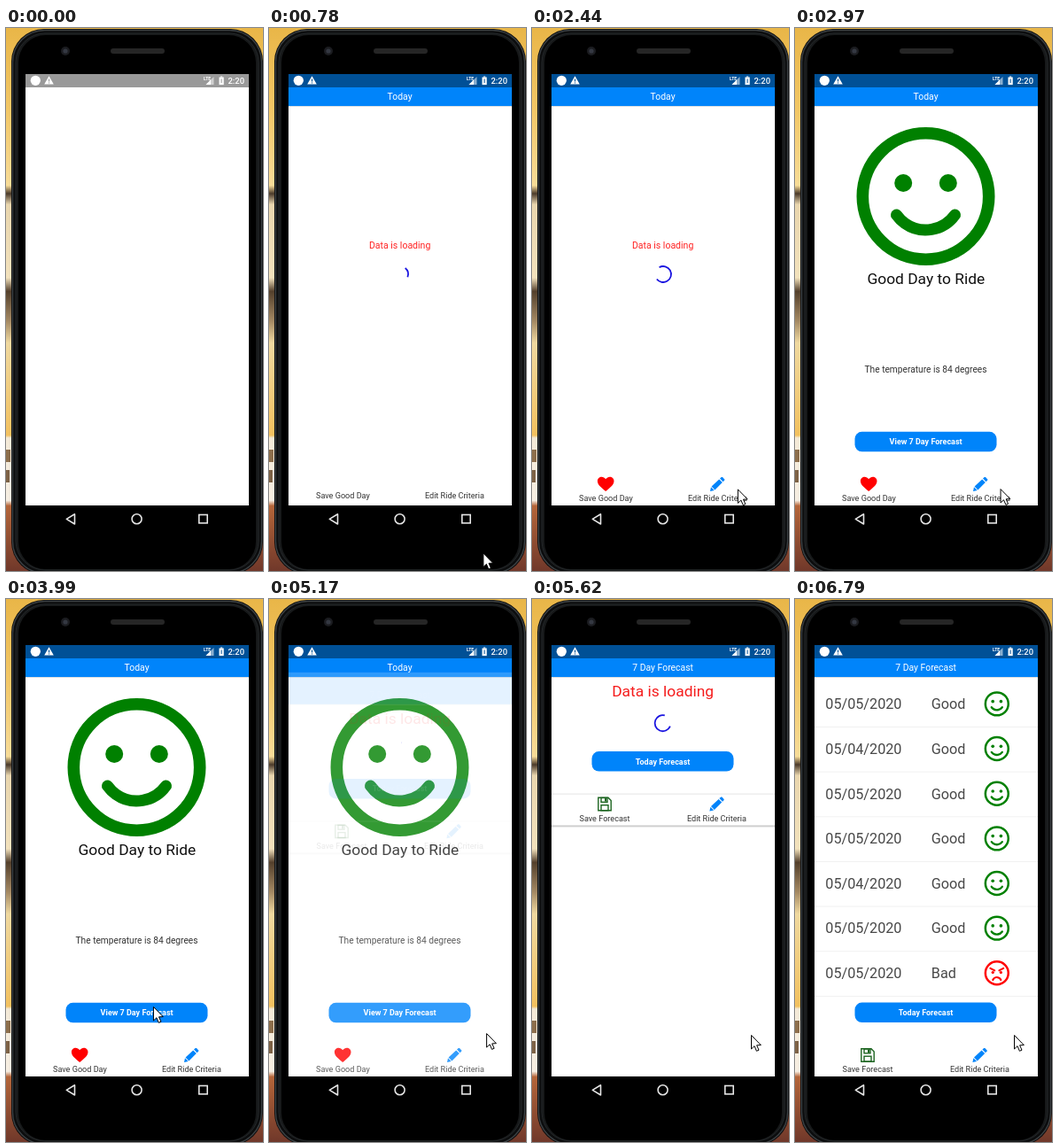
These frames come from a looping animation (290 by 613 pixels, 8000 ms). An HTML page with a canvas:

```html
<!DOCTYPE html>
<html lang="en">
<head>
<meta charset="utf-8">
<title>Ride day app</title>
<style>
  html, body { margin: 0; width: 100%; height: 100%; overflow: hidden; background: #000; }
  canvas { display: block; width: 290px; height: 613px; }
</style>
</head>
<body>
<canvas id="stage"></canvas>
<script>
const LOOP = 8000;
const BLUE = '#0084fa', GREEN = '#008000', RED = '#ff0000', INK = '#333';
const canvas = document.getElementById('stage');
const ctx = canvas.getContext('2d');
const ratio = window.devicePixelRatio || 1;
canvas.width = 290 * ratio;
canvas.height = 613 * ratio;

const clamp01 = v => Math.min(1, Math.max(0, v));

// Piecewise linear track through points [key, value, value...]
function track(points, key) {
  let i = 1;
  while (i < points.length - 1 && points[i][0] < key) i++;
  const a = points[i - 1], b = points[i];
  const u = clamp01((key - a[0]) / (b[0] - a[0]));
  return a.slice(1).map((v, k) => v + (b[k + 1] - v) * u);
}

// cubic-bezier(.4, 0, .2, 1)
function standardEase(x) {
  let lo = 0, hi = 1, s = 0.5;
  for (let i = 0; i < 20; i++) {
    s = (lo + hi) / 2;
    const bx = 1.2 * (1 - s) ** 2 * s + 0.6 * (1 - s) * s * s + s ** 3;
    if (bx < x) lo = s; else hi = s;
  }
  return s * s * (3 - 2 * s);
}

function rect(x, y, w, h, color) {
  ctx.fillStyle = color;
  ctx.fillRect(x, y, w, h);
}

function rounded(x, y, w, h, r, fill, stroke, width = 1) {
  ctx.beginPath();
  ctx.roundRect(x, y, w, h, r);
  if (fill) { ctx.fillStyle = fill; ctx.fill(); }
  if (stroke) { ctx.strokeStyle = stroke; ctx.lineWidth = width; ctx.stroke(); }
}

function disc(x, y, r, color) {
  ctx.beginPath();
  ctx.arc(x, y, r, 0, 7);
  ctx.fillStyle = color;
  ctx.fill();
}

function arc(x, y, r, from, to, color, width) {
  ctx.beginPath();
  ctx.arc(x, y, r, from, to);
  ctx.strokeStyle = color;
  ctx.lineWidth = width;
  ctx.stroke();
}

function polygon(points, fill, stroke, width) {
  ctx.beginPath();
  points.forEach(([x, y]) => ctx.lineTo(x, y));
  ctx.closePath();
  if (fill) { ctx.fillStyle = fill; ctx.fill(); }
  if (stroke) { ctx.strokeStyle = stroke; ctx.lineWidth = width; ctx.stroke(); }
}

function text(str, x, y, size, color, align = 'center', weight = 400) {
  ctx.font = `${weight} ${size}px Roboto, sans-serif`;
  ctx.textAlign = align;
  ctx.fillStyle = color;
  ctx.fillText(str, x, y);
}

function at(x, y, scale, draw) {
  ctx.save();
  ctx.translate(x, y);
  ctx.scale(scale, scale);
  draw();
  ctx.restore();
}

function wallpaper() {
  const g = ctx.createLinearGradient(0, 0, 0, 613);
  [[0, '#e9b648'], [0.15, '#f3c766'], [0.29, '#f8dc98'], [0.305, '#4b3a2a'], [0.325, '#e9d6ae'],
   [0.46, '#f3e2bd'], [0.485, '#54402c'], [0.54, '#a58a64'], [0.58, '#f0d9a0'], [0.75, '#f3c15f'],
   [0.755, '#f4ead8'], [0.87, '#f6eee2'], [0.88, '#b5663a'], [1, '#70382a']]
    .forEach(([p, c]) => g.addColorStop(p, c));
  rect(0, 0, 290, 613, g);
  rect(0, 476, 5, 14, '#8d6f4c');
  rect(0, 499, 4, 14, '#7d6246');
}

function phone() {
  rounded(6, 1, 284, 616, 37, '#0c0d0e');
  rounded(7.5, 2.5, 281, 613, 36, null, '#3c4144', 1.4);
  rounded(11, 6, 274, 606, 33, '#17191a', '#24282a', 1);
  rounded(14, 8, 268, 603, 31, '#000');
  disc(67, 26, 5, '#1b1c20');
  disc(67, 26, 2.6, '#343842');
  rounded(118, 23, 61, 6, 3, '#262626');

  ctx.lineJoin = 'round';
  polygon([[77.5, 548.8], [77.5, 560], [68.3, 554.4]], null, '#e4e4e4', 1.6);
  arc(147.6, 554.2, 5.5, 0, 7, '#e4e4e4', 1.6);
  ctx.lineJoin = 'miter';
  ctx.strokeRect(217.8, 549.5, 9.4, 9.4);
}

function statusBar(color) {
  rect(22, 52, 252, 15, color);
  disc(33.3, 59.3, 5.6, '#fff');
  polygon([[48.5, 54.3], [53.8, 63.6], [43.2, 63.6]], '#fff');
  rect(48, 57.5, 1.1, 3, color);
  rect(48, 61.4, 1.1, 1.1, color);
  text('LTE', 223, 58.5, 5, '#fff', 'left', 700);
  polygon([[234.5, 55], [234.5, 64], [225.5, 64]], '#ffffff88');
  polygon([[231, 58.5], [231, 64], [225.5, 64]], '#fff');
  rect(240.5, 55.5, 5.2, 8.6, '#fff');
  rect(242, 54.5, 2.2, 1, '#fff');
  rect(242.6, 57.5, 1, 4.5, color);
  text('2:20', 269, 62.8, 9.4, '#fff', 'right', 500);
}

function header(title) {
  rect(22, 52, 252, 36, BLUE);
  rect(22, 88, 252, 1, '#dcdfe3');
  text(title, 147.6, 81.4, 10.4, '#fff');
}

function button(label, y, opacity = 1) {
  ctx.save();
  ctx.globalAlpha *= opacity;
  rounded(67.5, y, 160, 22.5, 8, BLUE);
  text(label, 147.6, y + 14.5, 9, '#fff', 'center', 700);
  ctx.restore();
}

function spinner(x, y, elapsed) {
  const u = (elapsed / 1332) % 1;
  const turn = elapsed / 4444 * 2 + u / 4 - 0.25;
  const start = turn + 0.75 * standardEase(clamp01(2 * u - 1));
  const end = turn + 0.75 * standardEase(clamp01(2 * u));
  arc(x, y, 9, start * 2 * Math.PI, (end + 0.01) * 2 * Math.PI, '#1a14e0', 1.8);
}

function face(x, y, radius, good) {
  const color = good ? GREEN : RED;
  at(x, y, radius / 78, () => {
    ctx.lineCap = 'round';
    arc(0, 0, 71.2, 0, 7, color, 13.6);
    if (good) {
      disc(-25.3, -15, 10, color);
      disc(25.3, -15, 10, color);
      arc(0, -2.5, 40.5, 0.62, Math.PI - 0.62, color, 13);
    } else {
      disc(-25, -4, 9, color);
      disc(25, -4, 9, color);
      arc(0, 53, 27, Math.PI + 0.4, -0.4, color, 12);
      ctx.lineWidth = 11;
      ctx.beginPath();
      for (const side of [-1, 1]) {
        ctx.moveTo(side * 41, -30);
        ctx.lineTo(side * 14, -16);
      }
      ctx.stroke();
    }
    ctx.lineCap = 'butt';
  });
}

function heart(x, y) {
  at(x, y, 1, () => {
    ctx.beginPath();
    ctx.moveTo(0, 8.6);
    ctx.bezierCurveTo(-5, 4.5, -9.3, 1.5, -9.3, -2.8);
    ctx.bezierCurveTo(-9.3, -8, -2.8, -9.4, 0, -5);
    ctx.bezierCurveTo(2.8, -9.4, 9.3, -8, 9.3, -2.8);
    ctx.bezierCurveTo(9.3, 1.5, 5, 4.5, 0, 8.6);
    ctx.fillStyle = RED;
    ctx.fill();
  });
}

function pencil(x, y) {
  at(x, y, 1, () => {
    polygon([[-8, 8], [-7, 3.3], [-3.3, 7]], BLUE);
    polygon([[-6.4, 2.6], [2.2, -5.6], [5.8, -2], [-2.6, 6.4]], BLUE);
    polygon([[3, -6.4], [4.8, -8], [6, -8], [8.2, -5.6], [8.2, -4.6], [6.6, -2.8]], BLUE);
  });
}

function floppy(x, y) {
  const color = '#1c6420';
  at(x, y, 1, () => {
    polygon([[-7.2, -7.2], [4, -7.2], [7.2, -4], [7.2, 7.2], [-7.2, 7.2]], null, color, 1.4);
    ctx.strokeRect(-4, 1.2, 8, 6);
    ctx.strokeRect(-4, -7, 7, 4.8);
    rect(0, -6.4, 2, 3.4, color);
  });
}

function todayScreen(t) {
  rect(22, 67, 252, 472, '#fff');
  header('Today');
  if (t < 2920) {
    text('Data is loading', 147.6, 249.3, 10.5, '#ff2222');
    spinner(148, 278, t - 610);
  } else {
    const [press] = track([[4780, 1], [4850, 0.3], [4960, 0.3], [5130, 1]], t);
    face(147.5, 190, 78, true);
    text('Good Day to Ride', 147.8, 289, 17.4, '#111');
    text('The temperature is 84 degrees', 147.5, 389.2, 10.2, INK);
    button('View 7 Day Forecast', 455.8, press);
  }
  const hasHeart = t >= 1400, hasPencil = t >= 1550;
  if (hasHeart) heart(83.2, 514.3);
  if (hasPencil) pencil(209, 515);
  text('Save Good Day', 83.4, hasHeart ? 534.2 : 531, 9.1, INK);
  text('Edit Ride Criteria', 209.4, hasPencil ? 534.2 : 531, 9.1, INK);
}

function forecastScreen(t) {
  const loaded = t >= 6460;
  // Page and card each paint their own white layer
  rect(22, 52, 252, 487, '#fff');
  rect(22, 52, 252, 487, '#fff');
  header('7 Day Forecast');
  if (loaded) {
    for (let i = 0; i < 7; i++) {
      const y = 118.4 + i * 50.65;
      const good = i < 6 || t < 6790;
      const day = i === 1 || i === 4 ? '04' : '05';
      text(`05/${day}/2020`, 34.3, y + 5.8, 16.2, '#484848', 'left');
      text(good ? 'Good' : 'Bad', 153.8, y + 5.8, 16.2, '#484848', 'left');
      face(227.8, y, 14.2, good);
      rect(22, y + 25.6, 252, 1, '#f1f1f1');
    }
  } else {
    text('Data is loading', 147.6, 110.3, 17.4, '#f51c1c');
    spinner(147.6, 140.2, t - 5130);
  }
  const shift = loaded ? 0 : -283.5;
  button('Today Forecast', 455.6 + shift, 1);
  if (!loaded) {
    rect(22, 219.6, 252, 1, '#e4e4e4');
    rect(22, 255.4, 252, 2, '#cfcfcf');
  }
  floppy(82, 515 + shift);
  pencil(208.4, 515 + shift);
  text('Save Forecast', 82, 534.2 + shift, 9.1, INK);
  text('Edit Ride Criteria', 208.4, 534.2 + shift, 9.1, INK);
}

function cursor(t) {
  const [x, y] = track([
    [650, 244, 615], [1200, 233, 520.5], [2070, 233, 520.5], [2230, 232, 520.5],
    [3070, 231.5, 520], [3350, 227, 515], [3710, 227, 515], [3990, 166, 460],
    [4170, 156, 460], [4370, 156, 460], [4500, 144.5, 454], [4850, 144.5, 454],
    [5150, 245, 490], [5570, 247, 492]
  ], t);
  at(x, y, 1, () => polygon(
    [[0.5, 0.5], [0.5, 16], [4, 12.7], [6.4, 18.3], [9, 17.2], [6.6, 11.8], [11.3, 11.6]],
    '#fff', '#000', 1));
}

function render(t) {
  ctx.setTransform(ratio, 0, 0, ratio, 0, 0);
  wallpaper();
  phone();

  ctx.save();
  ctx.beginPath();
  ctx.rect(22, 52, 252, 487);
  ctx.clip();
  if (t < 550) {
    rect(22, 52, 252, 487, '#fff');
    statusBar('#999');
  } else {
    const progress = 1 - (1 - clamp01((t - 5155) / 350)) ** 5;
    if (progress < 1) todayScreen(t);
    if (progress > 0) {
      ctx.save();
      ctx.globalAlpha = track([[0, 0], [0.5, 0.25], [0.9, 0.7], [1, 1]], progress)[0];
      ctx.translate(0, 39 * (1 - progress));
      forecastScreen(t);
      ctx.restore();
    }
    statusBar('#005096');
  }
  ctx.restore();
  cursor(t);
}

const began = performance.now();
function tick() {
  render((performance.now() - began) % LOOP);
  requestAnimationFrame(tick);
}
tick();
</script>
</body>
</html>
```
